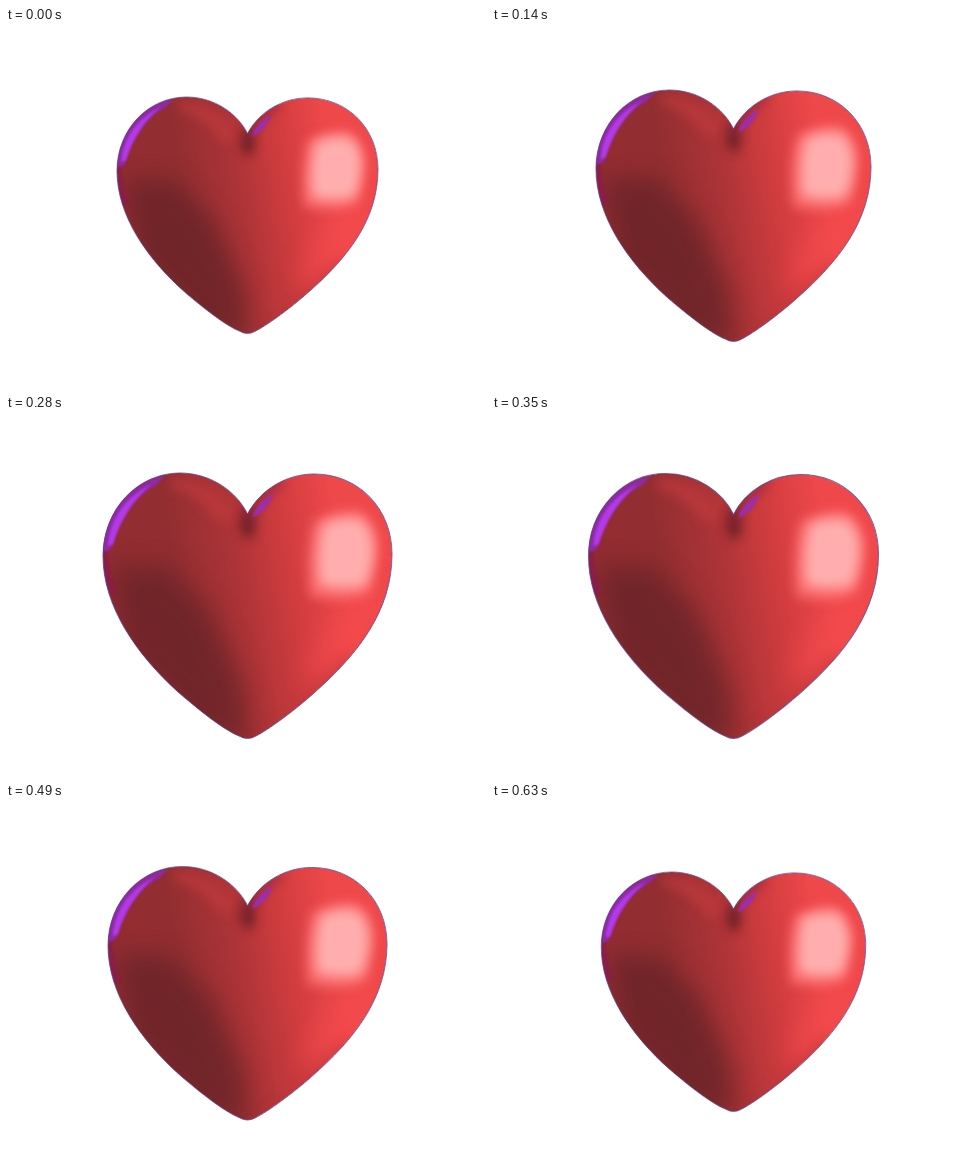
Animation of 480 by 360 pixels, one loop 0.7 s. Source, as an HTML page:

```html
<!DOCTYPE html>
<html lang="en">
<head>
<meta charset="utf-8">
<title>Beating heart</title>
<style>
  html, body { margin: 0; width: 100%; height: 100%; overflow: hidden; background: #fff; }
  svg { display: block; width: 100vw; height: 100vh; }
</style>
</head>
<body>
<svg viewBox="0 0 480 360">
  <defs>
    <path id="shape" d="M241.5 98C254 74 280 58 308 58C353 58 386 93 386 138C386 195 352 238 308 277
      C288 295 262 314 250 320Q241.5 325 233 320C218 314 194 295 172 276C130 238 97 190 97 140
      C97 93 132 57 174 57C205 57 231 76 241.5 98Z"/>
    <clipPath id="inside"><use href="#shape"/></clipPath>
    <linearGradient id="body" gradientUnits="userSpaceOnUse" x1="97" y1="165" x2="386" y2="120">
      <stop offset="0" stop-color="#932c32"/>
      <stop offset=".25" stop-color="#922e31"/>
      <stop offset=".46" stop-color="#ad3437"/>
      <stop offset=".65" stop-color="#d33d40"/>
      <stop offset=".82" stop-color="#ee484a"/>
      <stop offset="1" stop-color="#f0484b"/>
    </linearGradient>
    <g color-interpolation-filters="sRGB">
      <filter id="soft" filterUnits="userSpaceOnUse" x="0" y="0" width="480" height="360" color-interpolation-filters="sRGB"><feGaussianBlur stdDeviation="13"/></filter>
      <filter id="mid" filterUnits="userSpaceOnUse" x="0" y="0" width="480" height="360" color-interpolation-filters="sRGB"><feGaussianBlur stdDeviation="6"/></filter>
      <filter id="fine" filterUnits="userSpaceOnUse" x="0" y="0" width="480" height="360" color-interpolation-filters="sRGB"><feGaussianBlur stdDeviation="1"/></filter>
    </g>
  </defs>
  <g id="heart">
    <g clip-path="url(#inside)">
      <use href="#shape" fill="url(#body)"/>
      <!-- shaded lower left and lit upper left -->
      <path d="M105 150L160 150L205 195L238 270L243 330L200 320L120 235Z" fill="#652327" opacity=".75" filter="url(#soft)"/>
      <path d="M165 62Q205 62 232 100L215 108Q190 75 165 72Z" fill="#c23b3e" opacity=".7" filter="url(#mid)"/>
      <path d="M386 165Q375 210 325 258L295 262L325 205Z" fill="#f84c4f" opacity=".6" filter="url(#soft)"/>
      <path d="M252 326L312 277L345 242" fill="none" stroke="#a83438" stroke-width="7" opacity=".5" filter="url(#mid)"/>
      <!-- crease -->
      <path d="M241 90Q252 104 246 122L238 122Q232 106 241 90Z" fill="#561b22" opacity=".85" filter="url(#mid)"/>
      <path d="M240 104Q250 76 276 65" fill="none" stroke="#7c2040" stroke-width="10" opacity=".6" filter="url(#mid)"/>
      <path d="M246 101Q251 87 268 77Q263 92 250 100Z" fill="#9a2fb0" filter="url(#fine)"/>
      <!-- violet rim light -->
      <path d="M97 132Q99 158 107 178" fill="none" stroke="#8a1b50" stroke-width="8" opacity=".7" filter="url(#fine)"/>
      <path d="M97 135C98 98 122 67 160 59L150 69C128 80 114 103 106 131Q103 136 97 135Z" fill="#8e2aa8" filter="url(#fine)"/>
      <path d="M102 130C104 103 119 81 146 68C128 82 114 104 107 128Z" fill="#b23be6" filter="url(#fine)"/>
      <!-- window reflection -->
      <path d="M308 105Q328 94 352 94Q371 104 372 130Q371 160 363 178Q335 188 304 180Q299 140 308 105Z" fill="#ff7476" opacity=".85" filter="url(#mid)"/>
      <path d="M318 108Q335 101 354 103Q366 112 367 133Q366 155 359 169Q337 175 314 168Q310 135 318 108Z" fill="#ffb2b2" opacity=".95" filter="url(#mid)"/>
    </g>
    <use href="#shape" fill="none" stroke="#62448f" stroke-width="1" stroke-opacity=".85"/>
  </g>
</svg>
<script>
  const heart = document.getElementById("heart");
  const STEP = 70;
  // width, top and bottom of the heart at each step of the beat
  const beat = [
    [261, 69, 306], [266, 66, 309], [275, 62, 314], [283, 58, 320], [289, 57, 323],
    [290, 57.5, 323], [287, 59, 320.5], [279, 62.5, 316.5], [271, 65.5, 312], [264.5, 68, 308]
  ];

  function draw(now) {
    const [width, top, bottom] = beat[Math.floor(now / STEP) % beat.length];
    const sx = width / 289, sy = (bottom - top) / 266;
    heart.setAttribute("transform",
      `translate(241.5 ${top}) scale(${sx} ${sy}) translate(-241.5 -57)`);
    requestAnimationFrame(draw);
  }
  draw(performance.now());
</script>
</body>
</html>
```
